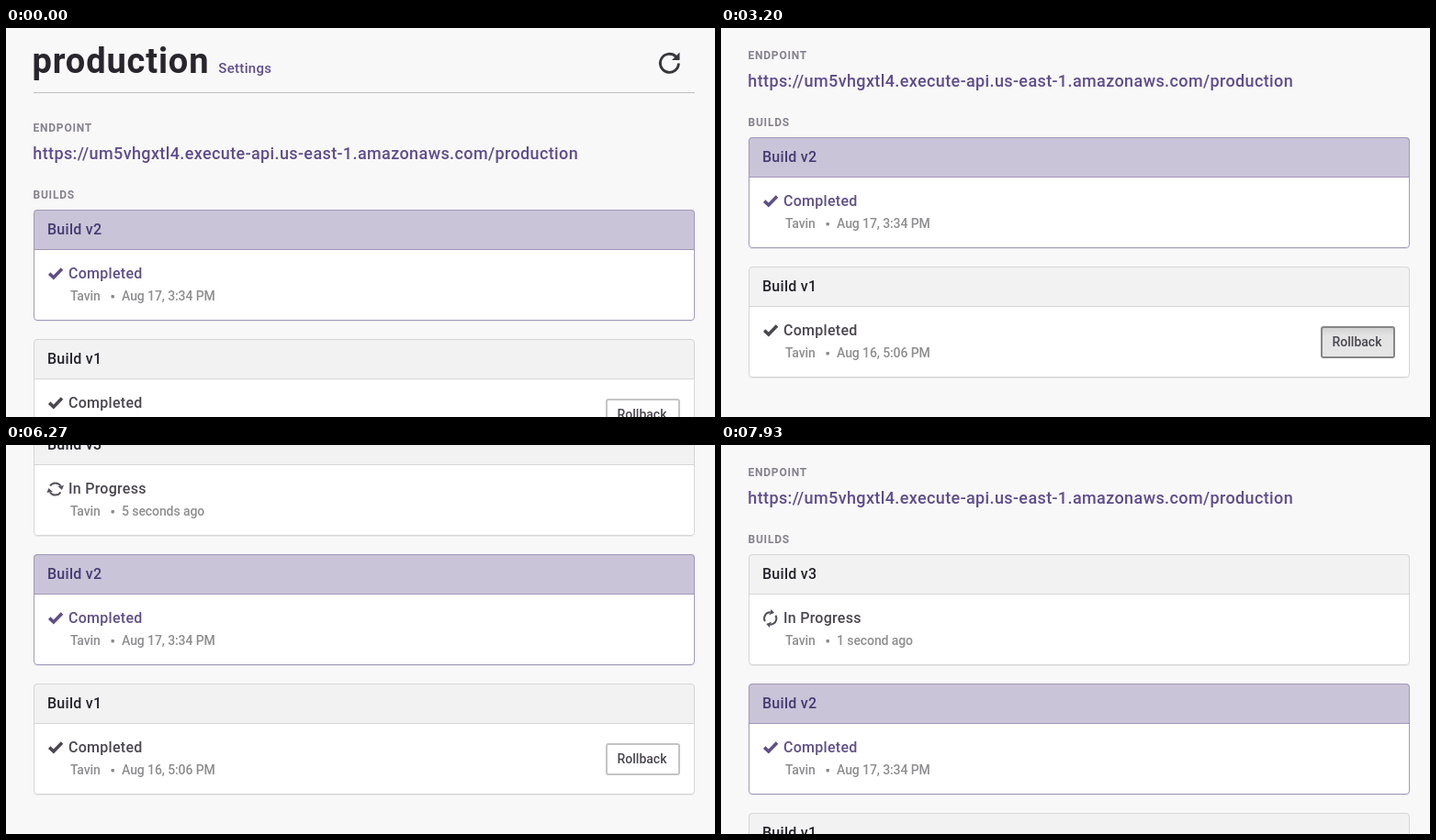
Recreate the animation shown at these times as an HTML page. Size 772 by 424 pixels, loop 8 s.

```html
<!DOCTYPE html>
<html lang="en">
<head>
<meta charset="utf-8">
<title>Build rollback</title>
<style>
  html, body { margin: 0; width: 100%; height: 100%; overflow: hidden; background: #f8f8f8; }
  svg { display: block; width: 772px; height: 424px; font-family: Roboto, Inter, sans-serif; }
  #page { font-weight: 500; }
  .title { font-size: 38px; font-weight: 700; letter-spacing: .85px; fill: #28262c; }
  .settings { font-size: 15px; letter-spacing: .32px; fill: #5f4d8c; }
  .label { font-size: 12px; font-weight: 700; letter-spacing: .78px; fill: #86828d; }
  .link { font-size: 18px; letter-spacing: .38px; fill: #5f4d8c; }
  .card { --edge: #d6d6d6; --head: #f2f2f2; --name: #26242b; --state: #4a474f; }
  .current { --edge: #a198b9; --head: #c9c4d7; --name: #463a72; --state: #5f4f88; }
  .name, .state { font-size: 16px; letter-spacing: .27px; }
  .name { fill: var(--name); }
  .state { fill: var(--state); }
  .meta { font-size: 14px; letter-spacing: -.1px; fill: #8e8e90; }
  .edge { fill: none; stroke: var(--edge); }
  .check { fill: none; stroke: var(--state); stroke-width: 3.6; }
  .action { font-size: 14px; fill: #4a474f; }
  .dialog { font-size: 14px; letter-spacing: .15px; fill: #37373b; }
  .dialog .choice { fill: #3a66d4; }
</style>
</head>
<body>
<svg viewBox="0 0 772 424">
  <defs>
    <linearGradient id="pressed" x2="0" y2="1">
      <stop offset="0" stop-color="#cfcfcf"/>
      <stop offset=".28" stop-color="#e3e3e3"/>
      <stop offset="1" stop-color="#e6e6e6"/>
    </linearGradient>
  </defs>
  <g id="page">
    <text class="title" x="28.5" y="49">production</text>
    <text class="settings" x="231.3" y="49">Settings</text>
    <path d="M732.4 38.5A10 10 0 1 1 729.4 31.2" fill="none" stroke="#38363b" stroke-width="2.9"/>
    <path d="M733.5 26.5v8.5h-8.5z" fill="#38363b"/>
    <path d="M30 70.5H750" stroke="#bfbfc1"/>
    <text class="label" x="29.5" y="113">ENDPOINT</text>
    <text class="link" x="29.3" y="143">https://um5vhgxtl4.execute-api.us-east-1.amazonaws.com/production</text>
    <text class="label" x="29.5" y="186">BUILDS</text>
    <g id="cards"></g>
  </g>
  <g id="modal" class="dialog">
    <rect width="772" height="424" fill="#000" opacity=".45"/>
    <rect x="169" y="144" width="442" height="101" rx="6" fill="#000" opacity=".15"/>
    <rect x="170" y="144" width="440" height="99" rx="5" fill="#fff"/>
    <path d="M170 203.5H610" stroke="#e0e0e0"/>
    <text x="194" y="180">Are you sure you want to rollback to this build?</text>
    <text class="choice" x="490.5" y="230">Cancel</text>
    <text class="choice" x="563.5" y="230">OK</text>
  </g>
</svg>
<script>
const $ = id => document.getElementById(id);
const LOOP = 8000, TOP = 198, PITCH = 141, BOTTOM = 79;

const check = '<path class="check" d="M47.2 69.6l4.6 4.4 9.2-9.4"/>';
const arrow = '<path d="M-5-4.4A6.7 6.7 0 0 1 6.2-2.4" fill="none" stroke="#55525a" stroke-width="2"/>' +
  '<path d="M3.2-2.4h6.6L7 2.2z" fill="#55525a"/>';
const spinner = `<g id="spinner">${arrow}<g transform="rotate(180)">${arrow}</g></g>`;
const rollback = `<rect id="button" x="654" y="66" width="79" height="33" rx="2" stroke-width="2"/>
  <text class="action" x="665.5" y="87">Rollback</text>`;

const card = (n, icon, state, when, extra = '') => `
  <g id="v${n}" class="card ${n === 2 ? 'current' : ''}">
    <rect x="30" y="1" width="720" height="121" rx="4" opacity=".06"/>
    <rect x="30" width="720" height="121" rx="4" fill="#fff"/>
    <path d="M30 43V4q0-4 4-4H746q4 0 4 4V43z" fill="var(--head)"/>
    <path class="edge" d="M30 43.5H750"/>
    <rect class="edge" x="30.5" y=".5" width="719" height="120" rx="3.5"/>
    <text class="name" x="45" y="27">Build v${n}</text>
    ${icon}
    <text class="state" x="68" y="75">${state}</text>
    <text class="meta" x="70" y="99">Tavin</text>
    <rect x="114.5" y="93" width="3.4" height="3.4" rx=".8" fill="#8b8b8d"/>
    <text class="meta" x="126" y="99" id="when${n}">${when}</text>
    ${extra}
  </g>`;

$('cards').innerHTML =
  card(3, spinner, 'In Progress', '') +
  card(2, check, 'Completed', 'Aug 17, 3:34 PM') +
  card(1, check, 'Completed', 'Aug 16, 5:06 PM', rollback);

const span = (t, start, length) => Math.min(1, Math.max(0, (t - start) / length));
const glide = p => 1 - (1 - p) ** 1.7;
const move = (id, y) => $(id).setAttribute('transform', `translate(0 ${y})`);
const show = (id, on) => $(id).setAttribute('visibility', on ? 'visible' : 'hidden');

function paintButton(t) {
  const held = t >= 3200 && t < 5130;
  const hover = t < 5130 ? span(t, 2335, 195) : 0;
  const gray = (from, to) => `rgb(${Array(3).fill(Math.round(from + (to - from) * hover))})`;
  $('button').setAttribute('fill', held ? 'url(#pressed)' : gray(255, 230));
  $('button').setAttribute('stroke', held ? '#868686' : gray(196, 173));
}

function draw(t) {
  const added = t >= 5200;
  const scroll = added
    ? BOTTOM + PITCH * (1 - glide(span(t, 6330, 770)))
    : BOTTOM * glide(span(t, 1000, 670));
  move('page', -Math.round(scroll));
  [3, 2, 1].forEach((n, i) => move('v' + n, TOP + PITCH * (added ? i : i - 1)));
  show('v3', added);
  show('modal', t >= 4130 && t < 5130);
  $('when3').textContent = t < 7130 ? '5 seconds ago' : '1 second ago';
  $('spinner').setAttribute('transform', `translate(53.7 70) rotate(${(t - 6270) * .18 - 10})`);
  paintButton(t);
}

const start = performance.now();
function tick() {
  draw((performance.now() - start) % LOOP);
  requestAnimationFrame(tick);
}
tick();
</script>
</body>
</html>
```
